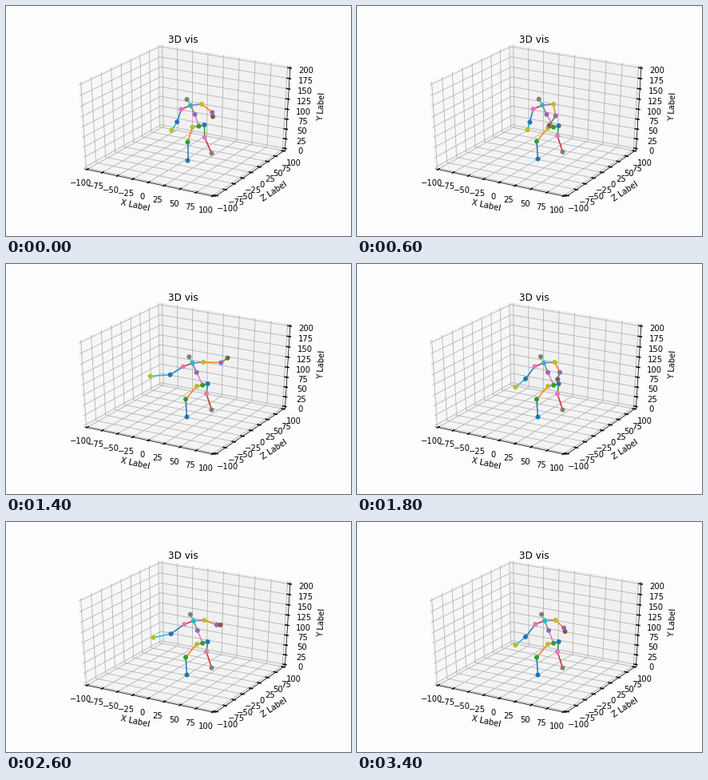
Recreate the animation shown at these times as a matplotlib script. Size 432 px wide and 288 px high, loop 3600 ms.

```python
import numpy as np
import matplotlib.pyplot as plt
from matplotlib.animation import FuncAnimation
from matplotlib.collections import LineCollection

W, H, DPI = 432, 288, 72
FRAMES, INTERVAL = 18, 200
BACKGROUND = "#fdfdfd"

# Camera and the rectangle the 3D view is drawn into (pixels, y down)
ELEV, AZIM, DIST = np.radians(30), np.radians(-60), 10
LEFT, BOTTOM, VIEW_W, VIEW_H = 54, 252, 334.8, 217.44
EDGE = 0.5 + 1 / 48      # panes reach slightly past the limits
TICK_GAP, LABEL_GAP = 0.0833, 0.181

RIGHT = np.array([-np.sin(AZIM), np.cos(AZIM), 0])
UP = np.array([-np.cos(AZIM) * np.sin(ELEV),
               -np.sin(AZIM) * np.sin(ELEV), np.cos(ELEV)])
TOWARD = np.array([np.cos(AZIM) * np.cos(ELEV),
                   np.sin(AZIM) * np.cos(ELEV), np.sin(ELEV)])


def project(*point):
    """Map a point of the centred unit cube to stage pixels."""
    p = np.array(point, float)
    depth = DIST - p @ TOWARD
    x, y = p @ RIGHT / depth, p @ UP / depth
    return (LEFT + (x + 0.095) / 0.185 * VIEW_W,
            BOTTOM - (y + 0.095) / 0.185 * VIEW_H)


def path(*points, **style):
    ax.plot(*zip(*(project(*p) for p in points)), **style)


def pane(corners, shade):
    ax.fill(*zip(*(project(*c) for c in corners)), facecolor=(shade,) * 3,
            edgecolor=(shade,) * 3, alpha=0.5, lw=1, zorder=1)


def axis_label(text, spot, start, end):
    (x0, y0), (x1, y1) = project(*start), project(*end)
    angle = np.degrees(np.arctan2(y0 - y1, x1 - x0))
    ax.text(*project(*spot), text, ha="center", va="center",
            rotation=(angle + 90) % 180 - 90, rotation_mode="anchor")


def draw_box():
    e = EDGE
    pane([(-e, -e, -e), (-e, e, -e), (-e, e, e), (-e, -e, e)], 0.95)
    pane([(-e, e, -e), (e, e, -e), (e, e, e), (-e, e, e)], 0.90)
    pane([(-e, -e, -e), (e, -e, -e), (e, e, -e), (-e, e, -e)], 0.925)

    grid = dict(color="#b0b0b0", lw=0.8, zorder=2)
    tick = dict(color="black", lw=1.5, zorder=3)
    out, inner = e + 0.1 / 12, e - 0.2 / 12
    far = e + TICK_GAP

    for i, t in enumerate(np.linspace(-0.5, 0.5, 9)):
        path((t, -e, -e), (t, e, -e), (t, e, e), **grid)
        path((e, t, -e), (-e, t, -e), (-e, t, e), **grid)
        path((-e, -e, t), (-e, e, t), (e, e, t), **grid)

        path((t, -out, -e), (t, -inner, -e), **tick)
        path((out, t, -e), (inner, t, -e), **tick)
        path((out, e, t), (inner, e, t), **tick)

        flat = str(25 * i - 100).replace("-", "\u2212")
        for spot, text in (((t, -far, -far), flat),
                           ((far, t, -far), flat),
                           ((far, far, t), str(25 * i))):
            ax.text(*project(*spot), text, ha="center", va="top")

    left, front = (-e, -e, -e), (e, -e, -e)
    right, top = (e, e, -e), (e, e, e)
    path(left, front, right, top, color="black", lw=0.75, zorder=3)

    d = e + LABEL_GAP
    axis_label("X Label", (0, -d, -d), left, front)
    axis_label("Z Label", (d, 0, -d), front, right)
    axis_label("Y Label", (d, d, 0), right, top)
    ax.text(221.4, 46, "3D vis", fontsize=12, ha="center", va="baseline")


# Legs settle and the torso sways, each from a first to a last place
LEGS = {
    "l_foot": [(227.5, 193.5), (226.5, 191.5)],
    "l_knee": [(227.5, 170.5), (225, 169.5)],
    "l_hip": [(233.5, 151.5), (239, 153)],
    "r_hip": [(248.5, 148.8), (252.6, 150)],
    "r_knee": [(248.7, 164.5), (251, 162.5)],
    "r_foot": [(257.5, 184.5), (257.5, 182.7)],
    "pelvis": [(241.5, 150.5), (246.2, 151.7)],
}
TORSO = {
    "spine": [(236.5, 135.8), (240, 135.8)],
    "neck": [(231, 124.5), (235, 123.7)],
    "head": [(226.5, 117), (231.2, 115.7)],
    "l_shoulder": [(219.4, 129.3), (223.5, 128)],
    "r_shoulder": [(245, 123), (248.5, 123)],
}
# Arms swing through a lowered, a half raised and a spread place
LEFT_ARM = {
    "l_elbow": [(216.5, 145.5), (210.5, 143.5), (205.5, 138.7)],
    "l_wrist": [(213.3, 155.3), (196.8, 153.5), (180.7, 140.5)],
}
RIGHT_ARM = {
    "r_elbow": [(248.7, 137.5), (258.2, 133.2), (269.3, 123.5)],
    "r_wrist": [(240.7, 149.5), (259, 138.5), (277.5, 117.7)],
}
# How far each arm is raised at the turning points of the gesture
BEATS = [0, 3, 5, 7, 9, 13, 17]
LEFT_RAISE = [0.18, 0, 0.71, 1, 0.45, 0.88, 0.45]
RIGHT_RAISE = [0.5, 0, 0.54, 1, 0.29, 0.76, 0.54]

JOINT_COLORS = dict(
    l_foot="C0", l_knee="C2", l_hip="C8", r_hip="C0", r_knee="C6",
    r_foot="C7", pelvis="C2", spine="C4", neck="C9", head="C7",
    l_shoulder="C6", l_elbow="C0", l_wrist="C8",
    r_shoulder="C8", r_elbow="C4", r_wrist="C5")
# Bones take the colour cycle in this order
BONES = [
    ("l_foot", "l_knee"), ("l_knee", "l_hip"),
    ("r_hip", "r_knee"), ("r_knee", "r_foot"),
    ("pelvis", "l_hip"), ("pelvis", "r_hip"),
    ("pelvis", "spine"), ("spine", "neck"), ("neck", "head"),
    ("l_wrist", "l_elbow"), ("l_elbow", "l_shoulder"),
    ("r_shoulder", "r_elbow"), ("r_elbow", "r_wrist"),
    ("l_shoulder", "neck"), ("neck", "r_shoulder"),
]


def blend(places, t):
    """Straight line through two places, parabola through three."""
    steps = np.linspace(0, 1, len(places))
    return sum(np.array(p) * np.prod([(t - other) / (own - other)
                                      for other in steps if other != own])
               for own, p in zip(steps, places))


def pose(frame):
    phases = (
        (LEGS, min(frame / 3, 1)),
        (TORSO, np.sin(np.pi / 2 * frame / (FRAMES - 1))),
        (LEFT_ARM, np.interp(frame, BEATS, LEFT_RAISE)),
        (RIGHT_ARM, np.interp(frame, BEATS, RIGHT_RAISE)),
    )
    return {name: blend(places, t)
            for part, t in phases for name, places in part.items()}


def update(frame):
    joints = pose(frame)
    bones.set_segments([(joints[a], joints[b]) for a, b in BONES])
    dots.set_offsets([joints[name] for name in JOINT_COLORS])
    return bones, dots


plt.rcParams["font.family"] = "DejaVu Sans"
plt.rcParams["font.size"] = 10
fig = plt.figure(figsize=(W / DPI, H / DPI), dpi=DPI, facecolor=BACKGROUND)
ax = fig.add_axes([0, 0, 1, 1])
ax.axis("off")
draw_box()

bones = LineCollection([], colors=[f"C{i % 10}" for i in range(len(BONES))],
                       linewidths=1.5, zorder=5)
ax.add_collection(bones, autolim=False)
blank = np.zeros(len(JOINT_COLORS))
dots = ax.scatter(blank, blank, s=20, c=list(JOINT_COLORS.values()),
                  linewidths=1.5, zorder=6)
ax.set(xlim=(0, W), ylim=(H, 0))

anim = FuncAnimation(fig, update, frames=FRAMES, interval=INTERVAL,
                     repeat=True, repeat_delay=0)
plt.show()
```
